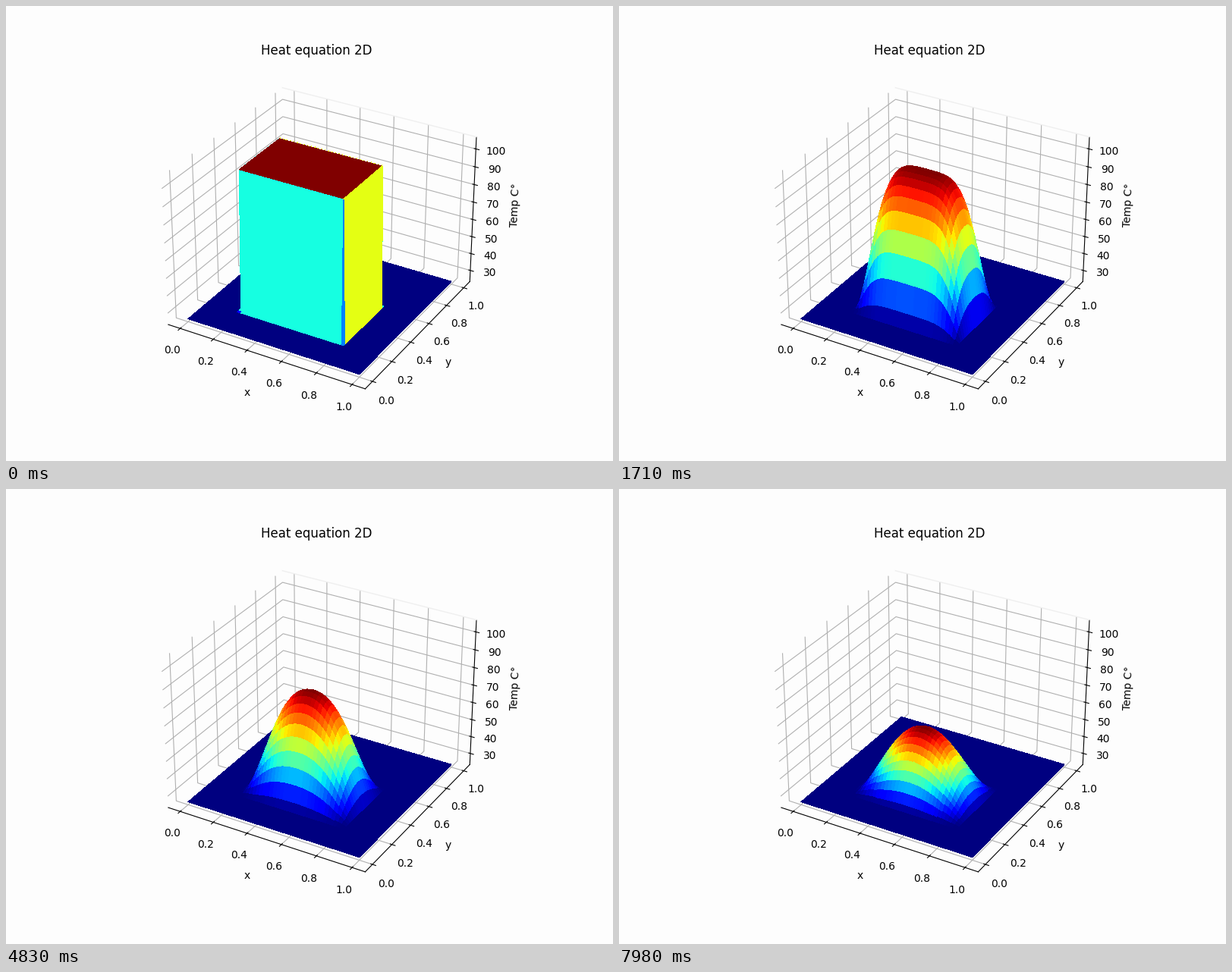
Write a matplotlib script that moves like this. It is 800x600 px and loops after 8000 ms.

```python
import numpy as np
import matplotlib.pyplot as plt
from matplotlib.animation import FuncAnimation
from matplotlib.collections import PolyCollection
from mpl_toolkits.mplot3d import proj3d
from mpl_toolkits.mplot3d.art3d import Poly3DCollection

W, H = 800, 600
PAPER = '#fdfdfd'
FRAMES, LOOP_MS = 267, 8000

N = 100                       # grid points per side
COLD, HOT = 25.0, 105.0
X0, X1, Y0, Y1 = 20, 80, 20, 60   # heated block, in grid indices
RATE, SUBSTEPS = 0.542, 3     # diffusion number per frame

jet = plt.get_cmap('jet')
grid = np.linspace(0, 1, N)


def heat_history():
    """Temperature field of every frame; the plate around the block stays cold."""
    u = np.full((N, N), COLD)
    u[Y0:Y1, X0:X1] = HOT
    fields = [u.copy()]
    for _ in range(FRAMES - 1):
        for _ in range(SUBSTEPS):
            lap = (u[Y0 - 1:Y1 - 1, X0:X1] + u[Y0 + 1:Y1 + 1, X0:X1]
                   + u[Y0:Y1, X0 - 1:X1 - 1] + u[Y0:Y1, X0 + 1:X1 + 1]
                   - 4 * u[Y0:Y1, X0:X1])
            u[Y0:Y1, X0:X1] += RATE / SUBSTEPS * lap
        fields.append(u.copy())
    return fields


def padded(lo, hi):
    pad = (hi - lo) / 48
    return lo - pad, hi + pad


def draw_room(fig):
    """Axes box, labels and cold plate."""
    ax = fig.add_subplot(projection='3d', facecolor='none')
    ax.set_title('Heat equation 2D', x=0.498)
    ax.set_xlabel('x')
    ax.set_ylabel('y')
    ax.set_zlabel('Temp C°')
    for axis in (ax.xaxis, ax.yaxis, ax.zaxis):
        axis.set_pane_color(PAPER)

    side, temp = padded(-0.05, 1.05), padded(COLD, HOT)
    ax.plot(side, [side[1]] * 2, [temp[1]] * 2, color='#efefef', lw=1)
    plate = [(0, 0, COLD), (1, 0, COLD), (1, 1, COLD), (0, 1, COLD)]
    ax.add_collection3d(Poly3DCollection([plate], facecolors=[jet(0.0)],
                                         linewidths=0, antialiaseds=False))
    ax.set_xlim(*side)
    ax.set_ylim(*side)
    ax.set_zlim(*temp)
    return ax


fields = heat_history()
fig = plt.figure(figsize=(W / 100, H / 100), dpi=100, facecolor=PAPER)

# The room never changes, so it is rendered once and kept as a backdrop.
room = draw_room(fig)
fig.canvas.draw()
backdrop = np.array(fig.canvas.buffer_rgba())
view = room.get_proj()
to_pixels = room.transData.frozen()

fig.clear()
fig.figimage(backdrop, zorder=-1)
stage = fig.add_axes([0, 0, 1, 1], zorder=1)
stage.set_axis_off()
stage.set_xlim(0, W)
stage.set_ylim(0, H)

# Patches of 2 x 2 cells, each outlined by its eight rim points.
RIM_X = np.array([0, 1, 2, 2, 2, 1, 0, 0])
RIM_Y = np.array([0, 0, 0, 1, 2, 2, 2, 1])
rows, cols = np.meshgrid(np.arange(Y0 - 2, Y1, 2), np.arange(X0 - 2, X1, 2),
                         indexing='ij')
rim_i = rows.reshape(-1, 1) + RIM_Y
rim_j = cols.reshape(-1, 1) + RIM_X

surface = PolyCollection([], linewidths=0, antialiaseds=False)
stage.add_collection(surface, autolim=False)


def update(frame):
    temp = fields[frame][rim_i, rim_j]
    px, py, depth = proj3d.proj_transform(grid[rim_j].ravel(),
                                          grid[rim_i].ravel(),
                                          temp.ravel(), view)
    points = to_pixels.transform(np.column_stack([px, py]))
    points = points.reshape(*temp.shape, 2)
    order = np.argsort(-np.asarray(depth).reshape(temp.shape).mean(axis=1),
                       kind='stable')
    mean = temp.mean(axis=1)
    colors = jet((mean - COLD) / (mean.max() - COLD))
    surface.set_verts(points[order])
    surface.set_facecolor(colors[order])
    return surface,


anim = FuncAnimation(fig, update, frames=FRAMES, interval=LOOP_MS / FRAMES,
                     init_func=lambda: update(0), repeat=True, repeat_delay=0)
plt.show()
```
